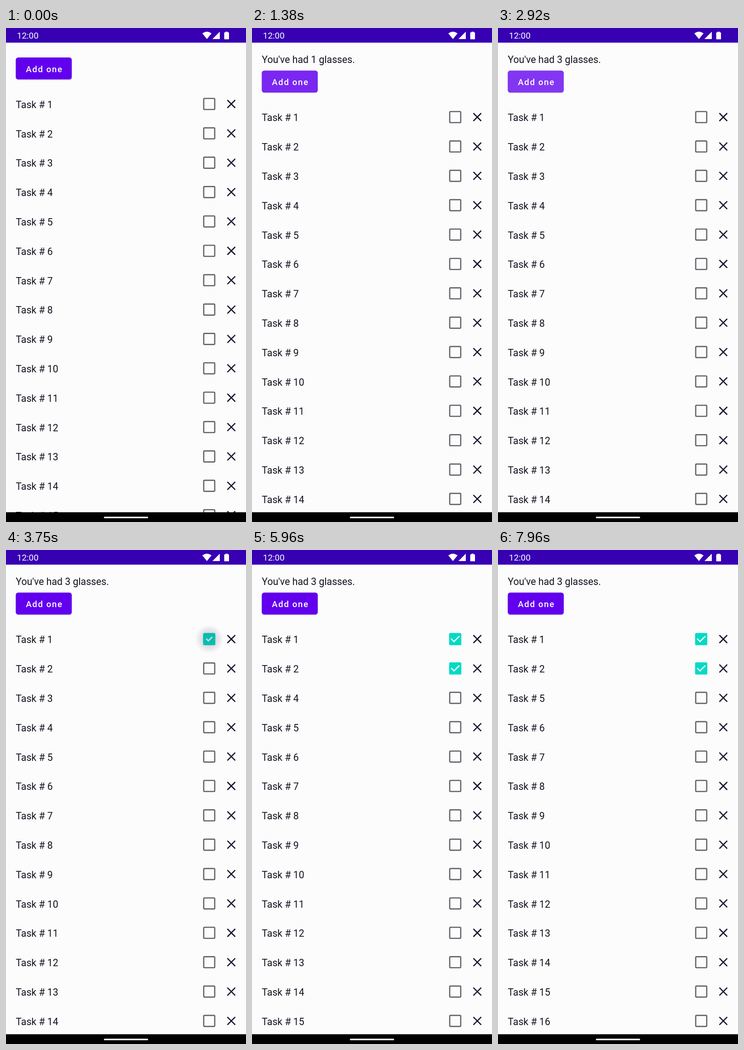
Write an HTML page with a canvas that moves like this. It is 522 px wide and 1073 px high and loops after 8000 ms.

```html
<!DOCTYPE html>
<html lang="en">
<head>
<meta charset="utf-8">
<title>Task list</title>
<style>
  html, body { margin: 0; width: 100%; height: 100%; overflow: hidden; }
  canvas { display: block; }
</style>
</head>
<body>
<canvas id="stage" width="522" height="1073"></canvas>
<script>
const ctx = document.getElementById('stage').getContext('2d');
const LOOP = 8000, DP = 1.33, PITCH = 63.8;
const PAPER = '#fcfcfd', INK = '#15131f', VIOLET = '#6200ee', TEAL = '#03dac5';
const HOLD = 90;                        // time from press to release
const addPresses = [1050, 1880, 2690];
const checkPresses = { 1: 3590, 2: 4370 };
const deletePresses = { 3: 5840, 4: 6700 };

const clamp = v => Math.max(0, Math.min(1, v));
const released = (press, t) => t >= press + HOLD;

function text(str, x, y, size, color, weight = 400, spacing = 0) {
  ctx.font = `${weight} ${size}px Roboto, sans-serif`;
  ctx.letterSpacing = spacing + 'px';
  ctx.fillStyle = color;
  ctx.fillText(str, x, y);
}

function roundRect(x, y, w, h, r) {
  ctx.beginPath();
  ctx.roundRect(x, y, w, h, r);
}

function polyline(points, close) {
  ctx.beginPath();
  points.forEach(([x, y]) => ctx.lineTo(x, y));
  if (close) ctx.closePath();
}

// Soft-edged disc that grows, then fades after the touch ends
function ripple(x, y, maxRadius, rgb, strength, age, core) {
  if (age < 0 || age > 550) return;
  const grow = 1 - (1 - clamp(age / 225)) ** 2;
  const alpha = strength * clamp(age / 75) * (1 - clamp((age - 250) / 300));
  const r = maxRadius * (0.3 + 0.7 * grow);
  const g = ctx.createRadialGradient(x, y, 0, x, y, r);
  g.addColorStop(core, `rgba(${rgb},${alpha})`);
  g.addColorStop(1, `rgba(${rgb},0)`);
  ctx.fillStyle = g;
  ctx.fillRect(x - r, y - r, 2 * r, 2 * r);
}

const touchRipple = (x, y, age) => ripple(x, y, 33, '25,20,50', 0.15, age, 0.45);

function button(y, t) {
  ctx.save();
  ctx.shadowColor = 'rgba(0,0,0,.12)';
  ctx.shadowBlur = 2;
  ctx.shadowOffsetY = 1;
  roundRect(21.3, y, 121.7, 47.7, 5.3);
  ctx.fillStyle = VIOLET;
  ctx.fill();
  ctx.restore();
  ctx.save();
  ctx.clip();
  for (const press of addPresses)
    ripple(82, y + 24, 105, '255,255,255', 0.21, t - press, 0.6);
  ctx.restore();
  text('Add one', 43.2, y + 31.5, 18.6, '#fff', 500, 1.66);
}

function checkbox(x, y, age) {
  const half = 10 * DP, line = 2 * DP;
  const fill = clamp(age / 60), draw = clamp(age / 100);
  ctx.lineWidth = line;
  if (fill < 1) {
    roundRect(x - half + line / 2, y - half + line / 2, 2 * half - line, 2 * half - line, line / 2 + 0.5);
    ctx.strokeStyle = '#646369';
    ctx.stroke();
  }
  if (!fill) return;
  ctx.globalAlpha = fill;
  roundRect(x - half, y - half, 2 * half, 2 * half, line);
  ctx.fillStyle = TEAL;
  ctx.fill();
  ctx.globalAlpha = 1;
  // The tick unfolds from its centre
  const at = (px, py) => [x + (px * draw) * 2 * half, y + (py * draw) * 2 * half];
  polyline([at(-0.3, 0), at(-0.1, 0.2), at(0.3, -0.2)]);
  ctx.lineCap = 'square';
  ctx.strokeStyle = PAPER;
  ctx.stroke();
  ctx.lineCap = 'butt';
}

function cross(x, y) {
  const a = 8.5;
  ctx.lineWidth = 2.5;
  ctx.strokeStyle = '#16142a';
  ctx.beginPath();
  for (const s of [-1, 1]) {
    ctx.moveTo(x - a, y - s * a);
    ctx.lineTo(x + a, y + s * a);
  }
  ctx.stroke();
}

function row(id, y, t) {
  text('Task # ' + id, 21.3, y + 8.8, 21.28, INK);
  checkbox(442, y, checkPresses[id] ? t - checkPresses[id] - HOLD : -1);
  cross(490, y);
  if (checkPresses[id]) touchRipple(442, y, t - checkPresses[id]);
  if (deletePresses[id]) touchRipple(490, y, t - deletePresses[id]);
}

function systemBars() {
  ctx.fillStyle = '#3700b3';
  ctx.fillRect(0, 0, 522, 31.8);
  text('12:00', 23.8, 23.2, 18.9, '#fff');
  ctx.beginPath();                      // wifi fan
  ctx.moveTo(437, 24);
  ctx.lineTo(427, 11.8);
  ctx.quadraticCurveTo(437, 4.2, 447, 11.8);
  ctx.fill();
  polyline([[449, 24], [465, 24], [465, 8]], true);
  ctx.fill();
  roundRect(474.6, 9.6, 10.4, 15, 1.2); // battery
  ctx.fill();
  ctx.fillRect(477.3, 8, 5, 2);
  ctx.fillStyle = '#000';
  ctx.fillRect(0, 1051.8, 522, 21.2);
  roundRect(213, 1061.6, 96, 3.2, 1.6);
  ctx.fillStyle = '#fff';
  ctx.fill();
}

function render(t) {
  ctx.fillStyle = PAPER;
  ctx.fillRect(0, 0, 522, 1073);
  const count = addPresses.filter(press => released(press, t)).length;
  const shift = count ? 28.5 : 0;
  if (count) text(`You've had ${count} glasses.`, 21.3, 76.3, 21.28, INK);
  button(64 + shift, t);
  let y = 165 + shift;
  for (let id = 1; y < 1090; id++) {
    if (deletePresses[id] && released(deletePresses[id], t)) continue;
    row(id, y, t);
    y += PITCH;
  }
  systemBars();
}

function tick() {
  render(performance.now() % LOOP);
  requestAnimationFrame(tick);
}
tick();
</script>
</body>
</html>
```
